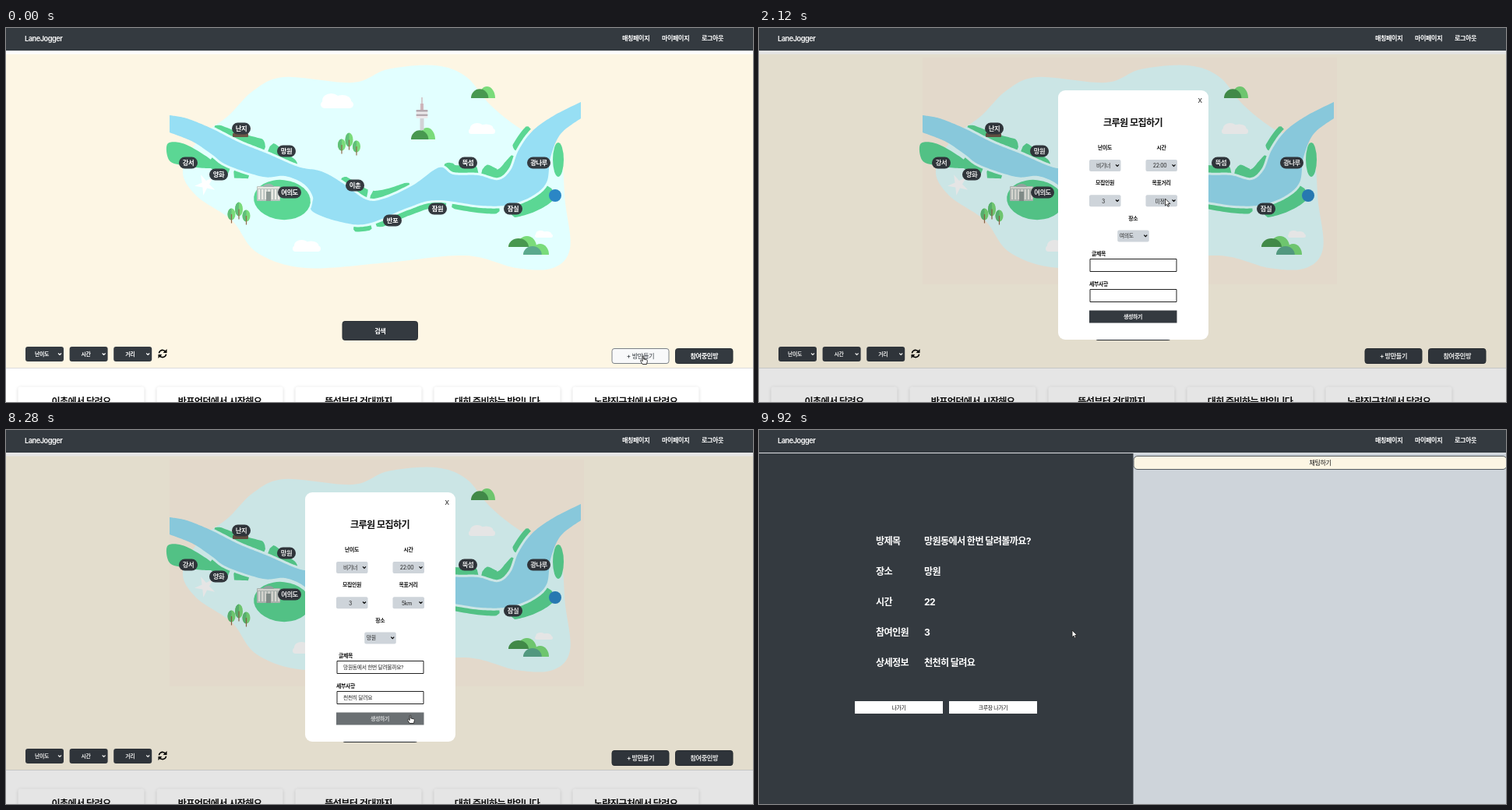
An HTML page with a canvas for the animation above (10000 ms loop, 959 by 480 pixels).

```html
<!DOCTYPE html>
<html lang="ko">
<head>
<meta charset="utf-8">
<title>LaneJogger</title>
<style>
html, body { margin: 0; width: 100%; height: 100%; overflow: hidden; background: #fff; }
canvas { display: block; width: 959px; height: 480px; }
</style>
</head>
<body>
<canvas id="stage" width="959" height="480"></canvas>
<script>
const ctx = document.getElementById('stage').getContext('2d');
const FONT = 'Inter, "Noto Sans CJK KR", "Noto Sans CJK", sans-serif';
const LOOP = 10000;
const DARK = '#343a40', CREAM = '#fdf6e4', GREY = '#ced4da', PALE = '#e2ffff';
const RIVER = '#97dff4', GREEN = '#5bd794', LEAF = '#7adb7a', MOSS = '#489850', TEAL = '#5ba98d';
const TITLE = '망원동에서 한번 달려볼까요?', DETAIL = '천천히 달려요';

// Moments and durations in ms
const OPEN = 240, CLOSE = 8440, LISTED = 8560, ROOM = 9680;
const VISIT = 540, CHOOSE = 200, TRAVEL = 300;

function rect(x, y, w, h, fill, r = 0, stroke) {
  ctx.beginPath();
  ctx.roundRect(x, y, w, h, r);
  if (fill) { ctx.fillStyle = fill; ctx.fill(); }
  if (stroke) { ctx.strokeStyle = stroke; ctx.lineWidth = 1; ctx.stroke(); }
}

function text(str, x, y, size, { color = '#111', weight = 400, align = 'center' } = {}) {
  ctx.font = `${weight} ${size}px ${FONT}`;
  ctx.letterSpacing = `${-size * 0.05}px`;
  ctx.textAlign = align;
  ctx.fillStyle = color;
  ctx.fillText(str, x, y + size * 0.37);
  return ctx.measureText(str).width;
}

function ellipse(x, y, rx, ry, color, from = 0, to = Math.PI * 2, turn = 0) {
  ctx.beginPath();
  ctx.ellipse(x, y, rx, ry, turn, from, to);
  ctx.fillStyle = color;
  ctx.fill();
}

function line(points, color, width = 1) {
  ctx.beginPath();
  points.forEach(([x, y]) => ctx.lineTo(x, y));
  ctx.strokeStyle = color;
  ctx.lineWidth = width;
  ctx.stroke();
}

function polygon(points, color) {
  ctx.beginPath();
  points.forEach(([x, y]) => ctx.lineTo(x, y));
  ctx.fillStyle = color;
  ctx.fill();
}

// Samples a smooth curve through the key points "x,y x,y ..."
function spline(keys, closed) {
  const p = keys.split(' ').map(s => s.split(',').map(Number));
  const last = p.length - 1;
  const at = i => closed ? p[(i + p.length) % p.length] : p[Math.max(0, Math.min(last, i))];
  const out = [];
  for (let i = 0; i <= (closed ? last : last - 1); i++) {
    for (let u = 0; u < 1; u += 1 / 16) {
      out.push([0, 1].map(k => {
        const [a, b, c, d] = [at(i - 1)[k], at(i)[k], at(i + 1)[k], at(i + 2)[k]];
        return b + u * ((c - a) / 2 + u * (a - 2.5 * b + 2 * c - d / 2 + u * (1.5 * (b - c) + (d - a) / 2)));
      }));
    }
  }
  if (!closed) out.push(p[last]);
  return out;
}

const land = spline('285,113 318,80 358,63 445,70 490,53 550,48 590,62 622,99 660,129 708,155 718,225 724,283 702,308 655,308 590,292 490,301 385,308 322,288 290,247 244,215 227,182 250,140', true);
const north = spline('210,112 232,116 264,129 300,147 335,161 375,178 405,184 432,199 462,220 485,219 522,202 556,179 574,188 606,189 632,195 648,182 658,157 676,132 704,112 738,95');
const south = spline('210,134 240,146 264,162 284,176 330,191 358,190 382,200 394,217 393,235 430,249 465,251 515,231 552,221 610,228 645,227 675,216 694,198 699,166 712,136 738,116');
const water = [...north, ...[...south].reverse()];

// Strip of grass beside a river edge: width runs from w0 to w1, with rounded ends
function bank(edge, x0, x1, w0, w1) {
  const side = edge === north ? 1 : -1, gap = 3;
  const shore = [], outer = [];
  edge.forEach(([x, y], i) => {
    if (x < x0 || x > x1 || !i || i === edge.length - 1) return;
    const dx = edge[i + 1][0] - edge[i - 1][0], dy = edge[i + 1][1] - edge[i - 1][1];
    const nx = side * dy / Math.hypot(dx, dy), ny = -side * dx / Math.hypot(dx, dy);
    const s = (x - x0) / (x1 - x0);
    const reach = gap + (w0 + (w1 - w0) * s) * Math.min(1, 1.8 * Math.sqrt(Math.sin(Math.PI * s)));
    shore.push([x + nx * gap, y + ny * gap]);
    outer.unshift([x + nx * reach, y + ny * reach]);
  });
  polygon([...shore, ...outer], GREEN);
}

function banks() {
  bank(north, 265, 331, 5, 13);
  bank(north, 334, 373, 14, 3);
  bank(north, 428, 462, 6, 10);
  bank(north, 466, 521, 11, 4);
  bank(north, 561, 606, 9, 10);
  bank(north, 609, 655, 14, 8);
  bank(north, 657, 677, 7, 7);
  polygon(spline('208,148 232,150 268,173 262,180 225,176 209,169', true), GREEN);
  bank(south, 266, 291, 12, 10);
  bank(south, 294, 316, 10, 3);
  bank(south, 446, 469, 6, 6);
  bank(south, 471, 567, 7, 7);
  bank(south, 570, 635, 6, 7);
  bank(south, 644, 693, 14, 18);
  ellipse(709, 169, 7, 22, GREEN);
}

function cloud(x, y, w, h) {
  rect(x, y + h * 0.5, w, h * 0.5, '#fff', h * 0.25);
  ellipse(x + w * 0.32, y + h * 0.47, w * 0.27, h * 0.47, '#fff');
  ellipse(x + w * 0.66, y + h * 0.5, w * 0.27, h * 0.4, '#fff');
}

function grove(x, y) {
  for (let i = 0; i < 3; i++) {
    const cx = x + i * 9.5, cy = y + (i === 1 ? -6.5 : i), tall = i === 1 ? 9 : 7.5;
    ellipse(cx, cy, 5, tall, LEAF);
    ellipse(cx, cy, 5, tall, '#60c078', Math.PI / 2, Math.PI * 1.5);
    line([[cx, cy], [cx, cy + tall + 4]], '#94694a', 1.2);
  }
}

function hill(x, y, w, h, left) {
  ellipse(x + w * 0.66, y, w * 0.34, h, LEAF, Math.PI, 0);
  ellipse(x + w * 0.36, y, w * 0.36, h * 0.78, left, Math.PI, 0);
}

function tower() {
  hill(520, 143, 31, 15, MOSS);
  rect(531.5, 116, 5, 15, '#d2d2d7');
  line([[534, 89], [534, 106]], '#c99a9e');
  rect(532, 97, 4, 9, '#cdb5ba');
  for (let i = 0; i < 4; i++) rect(526.5, 105 + i * 2.7, 15, 2.7, i % 2 ? '#eee9ec' : '#b5a9af', 1);
}

function hall() {
  rect(322, 203, 30, 19, '#bcc5c1', 1);
  ellipse(337, 204, 7, 4, '#a2b4b0', Math.PI, 0);
  rect(323, 204, 28, 2, '#e8e8e2');
  for (let x = 324; x < 351; x += 4.2) rect(x, 207, 2, 13, '#f0efe9');
  rect(334, 210, 6, 12, '#8d9995');
}

function plane(x, y) {
  const star = Array.from({ length: 10 }, (_, i) => {
    const r = i % 2 ? 5 : 14, a = i * Math.PI / 5 - 0.75;
    return [x + r * Math.cos(a), y + r * Math.sin(a)];
  });
  polygon(star, '#fff');
}

const PLACES = {
  난지: [302, 129], 망원: [360, 158], 강서: [234, 173], 양화: [273, 188], 여의도: [364, 211], 이촌: [448, 202],
  반포: [496, 247], 잠원: [554, 232], 뚝섬: [593, 173], 잠실: [651, 232], 광나루: [684, 173]
};

function map() {
  polygon(land, PALE);
  polygon(water, RIVER);
  banks();
  ellipse(354.5, 220.5, 39, 28, PALE, 0, 7, 0.1);
  ellipse(354.5, 220.5, 36.5, 25.5, GREEN, 0, 7, 0.1);
  cloud(404, 84, 42, 19);
  cloud(594, 122, 34, 14);
  cloud(368, 272, 36, 15);
  cloud(679, 260, 23, 9);
  grove(431, 150);
  grove(289.5, 239);
  hill(597, 90, 31, 15, MOSS);
  hill(645, 281, 36, 14, MOSS);
  hill(664, 291, 33, 14, TEAL);
  tower();
  hall();
  plane(256, 201);
  rect(291, 135, 20, 5, '#6b5546', 1);
  ellipse(705, 215, 8, 8, '#2b86c5');
  for (const [name, [x, y]] of Object.entries(PLACES)) {
    const w = name.length > 2 ? 30 : 24;
    rect(x - w / 2, y - 7.5, w, 15, DARK, 7.5);
    text(name, x, y, 8.3, { color: '#fff', weight: 700 });
  }
}

function chevron(x, y, color) {
  line([[x - 2, y - 1], [x, y + 1], [x + 2, y - 1]], color, 1.2);
}

const MAKE = { x: 777.5, y: 411, w: 74, h: 20 };
const JOIN = { x: 859, y: 411, w: 74.5, h: 20 };
const SEARCH = { x: 431.5, y: 376, w: 97.5, h: 25 };
const SUBMIT = { x: 424, y: 362.5, w: 112.5, h: 16 };
const TITLE_BOX = { x: 425, y: 296.5, w: 111, h: 16 };
const DETAIL_BOX = { x: 425, y: 335.5, w: 111, h: 16 };
const inside = (m, b) => m.x > b.x && m.x < b.x + b.w && m.y > b.y && m.y < b.y + b.h + 1;

function button(label, { x, y, w, h }, hover) {
  rect(x + 0.5, y + 0.5, w - 1, h - 1, hover ? '#f8f9fa' : DARK, 3, hover ? '#7b8187' : '#2b3035');
  text(label, x + w / 2, y + h / 2, 8.2, { color: hover ? DARK : '#fff', weight: hover ? 500 : 700 });
}

function refreshIcon(x, y) {
  for (const side of [1, -1]) {
    ctx.save();
    ctx.translate(x, y);
    ctx.scale(side, side);
    ctx.beginPath();
    ctx.arc(0, 0, 4.6, Math.PI * 1.04, Math.PI * 1.8);
    ctx.strokeStyle = '#000';
    ctx.lineWidth = 1.6;
    ctx.stroke();
    polygon([[5.5, -6], [5.5, -1], [0.6, -1]], '#000');
    ctx.restore();
  }
}

function header() {
  rect(0, 0, 959, 29, DARK);
  text('LaneJogger', 24, 13.5, 9.2, { color: '#fff', weight: 600, align: 'left' });
  ['매칭페이지', '마이페이지', '로그아웃'].forEach((s, i) =>
    text(s, 791 + i * 51, 13.5, 8.1, { color: '#fff', weight: 700, align: 'left' }));
}

const CARDS = ['이촌에서 달려요', '반포언덕에서 시작해요', '뚝섬부터 건대까지', '대회 준비하는 방입니다', '노량진근처에서 달려요'];

function mainPage(t, mouse, modal) {
  rect(0, 0, 959, 480, '#fff');
  rect(0, 33.5, 959, 402.5, CREAM);
  if (modal) rect(210, 38, 532, 291, '#fdf1e2');
  rect(0, 436, 959, 1, '#dcdcdc');
  map();
  button('검색', SEARCH);
  ['난이도', '시간', '거리'].forEach((label, i) => {
    const x = 25 + i * 56.6;
    rect(x, 409, 49, 19, DARK, 3);
    text(label, x + 21, 418.7, 6.9, { color: '#fff', weight: 700 });
    chevron(x + 44, 418.5, '#fff');
  });
  refreshIcon(201, 418);
  button('+ 방만들기', MAKE, !modal && inside(mouse, MAKE));
  button('참여중인방', JOIN, !modal && inside(mouse, JOIN));
  const titles = t >= LISTED ? [TITLE, ...CARDS] : CARDS;
  titles.slice(0, 5).forEach((title, i) => {
    const x = 15.5 + i * 178;
    ctx.save();
    ctx.shadowColor = 'rgba(0,0,0,.16)';
    ctx.shadowBlur = 4;
    ctx.shadowOffsetY = 1;
    rect(x, 460.5, 162, 40, '#fff', 3);
    ctx.restore();
    text(title, x + 81, 480, 12.1, { weight: 700 });
  });
  if (modal) rect(0, 29, 959, 451, 'rgba(0,0,0,.1)');
  header();
}

// Every keystroke state of one Hangul syllable
function strokes(ch) {
  const code = ch.charCodeAt(0) - 0xac00;
  if (code < 0 || code > 11171) return [ch];
  const lead = 'ㄱㄲㄴㄷㄸㄹㅁㅂㅃㅅㅆㅇㅈㅉㅊㅋㅌㅍㅎ'[Math.floor(code / 588)];
  const tail = code % 28;
  const open = String.fromCharCode(0xac00 + code - tail);
  return tail ? [lead, open, ch] : [lead, open];
}

function typing(str, focus, start, step, blur) {
  const steps = [''];
  [...str].forEach((ch, i) => strokes(ch).forEach(s => steps.push(str.slice(0, i) + s)));
  return { steps, focus, start, step, blur };
}
const typeTitle = typing(TITLE, 4000, 4260, 60, 6640);
const typeDetail = typing(DETAIL, 6640, 6840, 53, CLOSE);

function input({ x, y, w, h }, { steps, focus, start, step, blur }, t) {
  rect(x, y, w, h, '#fff', 0, '#222');
  const n = Math.max(0, Math.min(steps.length - 1, Math.floor((t - start) / step)));
  const width = text(steps[n], x + 8, y + 8.2, 6.8, { color: '#222', align: 'left' });
  const end = start + steps.length * step;
  const busy = t >= start && t < end;
  const idle = t < start ? t - focus : t - end;
  if (t >= focus && t < blur && (busy || idle % 1000 < 500)) rect(x + 8.5 + width, y + 4, 0.8, 9, '#000');
}

// Form fields in the order they are visited, on a grid of columns and rows
const FIELDS = [
  { label: '난이도', col: 0, row: 0, values: ['비기너', '비기너'] },
  { label: '모집인원', col: 0, row: 1, values: ['1', '3'] },
  { label: '시간', col: 1, row: 0, values: ['18:00', '22:00'] },
  { label: '목표거리', col: 1, row: 1, values: ['미정', '5km'] },
  { label: '장소', col: 0.5, row: 2, values: ['여의도', '망원'] }
].map((f, i) => ({ ...f, x: 424 + 72.5 * f.col, y: 169 + 45.2 * f.row, visit: VISIT * (i + 1) }));

function field({ label, values, x, y, visit, row }, t) {
  text(label, x + 20, y - 15.3, 6.9, { weight: 600 });
  rect(x, y, 40.5, 15, GREY, 2);
  const value = values[t < visit + CHOOSE ? 0 : 1];
  if (row === 2) text(value, x + 2.5, y + 7.5, 6.9, { color: '#222', align: 'left' });
  else text(value, x + 18, y + 7.8, 6.9, { color: '#222' });
  chevron(x + 36, y + 7.3, '#000');
}

function modalBox(t, mouse) {
  rect(384, 80, 193, 320, '#fff', 9);
  text('X', 566, 93, 8);
  text('크루원 모집하기', 480, 121.5, 12.1, { weight: 600 });
  FIELDS.forEach(f => field(f, t));
  text('글제목', 427, 289.5, 6.9, { weight: 600, align: 'left' });
  text('세부사항', 424, 328.5, 6.9, { weight: 600, align: 'left' });
  input(TITLE_BOX, typeTitle, t);
  input(DETAIL_BOX, typeDetail, t);
  const hover = inside(mouse, SUBMIT);
  rect(SUBMIT.x, SUBMIT.y, SUBMIT.w, SUBMIT.h, hover ? '#6b7073' : DARK);
  text('생성하기', 480, 370.5, 6.9, { color: hover ? '#d5d7d8' : '#fff', weight: 700 });
}

function roomPage() {
  rect(0, 0, 959, 480, DARK);
  rect(480.5, 30, 479, 450, GREY);
  header();
  rect(0, 29, 959, 1, '#dfe2e5');
  rect(481, 33.5, 479, 17, CREAM, 5, '#555b60');
  text('채팅하기', 720.5, 42, 8);
  const rows = { 방제목: TITLE, 장소: '망원', 시간: '22', 참여인원: '3', 상세정보: DETAIL };
  Object.entries(rows).forEach((row, i) => row.forEach((s, col) =>
    text(s, 150 + col * 62, 142.5 + i * 39, 12.1, { color: '#fff', weight: 700, align: 'left' })));
  ['나가기', '크루장 나가기'].forEach((s, i) => {
    rect(123 + i * 121, 348, 113, 16, '#fff');
    text(s, 179.5 + i * 121, 356, 6.9);
  });
}

const ARROW = new Path2D('M0 0V9L2.1 7.1L3.5 10.2L5 9.5L3.6 6.5H6.4Z');
const HAND = new Path2D('M-0.8 0.5Q0 -0.8 0.8 0.5V4L4.8 5Q5.6 5.3 5.4 6.5L4.5 10.5H-0.8L-3.4 6.4Q-3.6 5 -2.3 5.3L-0.8 6.7Z');

function pointer({ x, y }, kind) {
  ctx.save();
  ctx.translate(x, y);
  if (kind === 'text') {
    for (const s of [-1, 1]) line([[s * 2.5, -4.5], [0, -3.5], [0, 3.5], [s * 2.5, 4.5]], '#222', 0.9);
  } else {
    const shape = kind === 'hand' ? HAND : ARROW;
    ctx.fillStyle = '#fff';
    ctx.strokeStyle = '#222';
    ctx.lineWidth = 0.9;
    ctx.fill(shape);
    ctx.stroke(shape);
  }
  ctx.restore();
}

// The pointer rests at each stop and sets off TRAVEL ms before the next
const stop = (at, x, y) => ({ at, x, y });
const STOPS = [
  stop(0, 818, 421),
  ...FIELDS.map(f => stop(f.visit, f.x + 25, f.y + 7)),
  stop(VISIT * 6, 466, 313),
  stop(4000, 487, 308),
  stop(typeDetail.focus, 490, 345),
  stop(8200, 519, 366),
  stop(9300, 893, 422),
  stop(9900, 402, 257)
];

function mouseAt(t) {
  const next = STOPS.find(s => s.at > t);
  if (!next) return STOPS.at(-1);
  const from = STOPS[STOPS.indexOf(next) - 1];
  const u = Math.max(0, 1 - (next.at - t) / TRAVEL);
  const e = u * u * (3 - 2 * u);
  return { x: from.x + (next.x - from.x) * e, y: from.y + (next.y - from.y) * e };
}

function pointerKind(mouse, t, modal) {
  const over = (...boxes) => boxes.some(b => inside(mouse, b));
  if (t >= ROOM) return 'arrow';
  if (!modal) return over(MAKE, JOIN) ? 'hand' : 'arrow';
  if (over(SUBMIT)) return 'hand';
  return over(TITLE_BOX, DETAIL_BOX) ? 'text' : 'arrow';
}

function draw(now) {
  const t = now % LOOP;
  const mouse = mouseAt(t);
  const modal = t >= OPEN && t < CLOSE;
  if (t >= ROOM) roomPage();
  else mainPage(t, mouse, modal);
  if (modal) modalBox(t, mouse);
  pointer(mouse, pointerKind(mouse, t, modal));
}

let begin;
function tick(now) {
  begin ??= now;
  draw(now - begin);
  requestAnimationFrame(tick);
}
draw(0);
requestAnimationFrame(tick);
</script>
</body>
</html>
```
